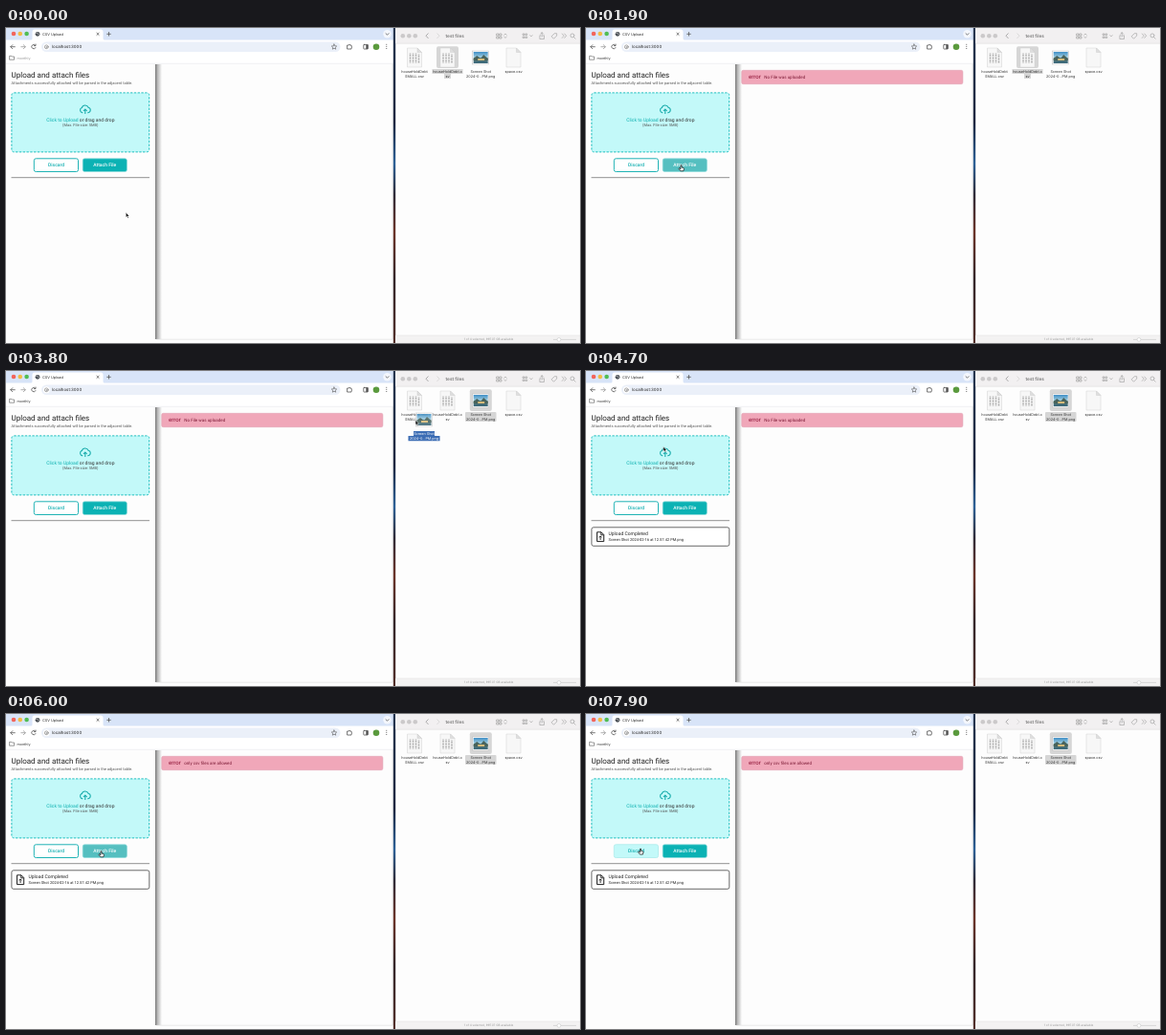
Recreate the animation shown at these times as an HTML page. Size 600 px wide and 330 px high, loop 8000 ms.

```html
<!DOCTYPE html>
<html lang="en">
<head>
<meta charset="utf-8">
<title>CSV Upload</title>
<style>
  html, body { margin: 0; width: 100%; height: 100%; overflow: hidden; background: #fdfdfd; }
  svg { display: block; width: 100vw; height: 100vh; text-rendering: geometricPrecision; }
  .page text { font-family: Roboto, Arial, sans-serif; }
  .ui text, .files text, #ghost text { font-family: Inter, Roboto, sans-serif; }
  .mid { text-anchor: middle; }
  .line { fill: none; stroke: #555; stroke-width: .8; stroke-linecap: round; stroke-linejoin: round; }
  .soft { stroke: #999; }
  .files text, #ghost text { font-size: 3.75px; text-anchor: middle; fill: #333; }
  #ghost text { fill: #fff; }
  .pick { fill: #d6d6d6; }
</style>
</head>
<body>
<svg viewBox="0 0 600 330" preserveAspectRatio="none">
  <defs>
    <linearGradient id="shade">
      <stop offset="0" stop-color="#747474"/>
      <stop offset=".3" stop-color="#b2b2b2"/>
      <stop offset="1" stop-color="#fdfdfd"/>
    </linearGradient>
    <linearGradient id="desk" x2="0" y2="1">
      <stop offset="0" stop-color="#27364f"/>
      <stop offset=".3" stop-color="#1c2740"/>
      <stop offset=".43" stop-color="#2e6298"/>
      <stop offset=".53" stop-color="#302c38"/>
      <stop offset=".65" stop-color="#6b3429"/>
      <stop offset=".8" stop-color="#34272a"/>
      <stop offset="1" stop-color="#53302b"/>
    </linearGradient>
    <linearGradient id="sky" x2="0" y2="1">
      <stop offset="0" stop-color="#3f8fc6"/>
      <stop offset=".5" stop-color="#a5cfdf"/>
      <stop offset=".55" stop-color="#59746a"/>
      <stop offset="1" stop-color="#38687d"/>
    </linearGradient>
    <g id="sheet">
      <path d="M-7.5-10H3L7.5-5.5V10H-7.5Z" fill="#f7f7f7" stroke="#d0d0d0" stroke-width=".5"/>
      <path d="M3-10V-5.5H7.5Z" fill="#dedede" stroke="#c8c8c8" stroke-width=".4"/>
    </g>
    <g id="table">
      <use href="#sheet"/>
      <path d="M-4.5-4.5V6M-1.5-4.5V6M1.5-4.5V6M4.5-3.5V6" stroke="#aaa" stroke-width="1.5" stroke-dasharray="1 .5"/>
    </g>
    <g id="photo">
      <rect x="-8.5" y="-7" width="17" height="14" fill="#fff" stroke="#bbb" stroke-width=".5"/>
      <rect x="-7.5" y="-6" width="15" height="12" fill="url(#sky)"/>
      <path d="M-7.5 1L-4-2 0 1 3-3 7.5 1V3H-7.5Z" fill="#48635c"/>
      <rect x="-3" y="1" width="7" height="2" fill="#d6ba79"/>
    </g>
  </defs>

  <rect width="600" height="330" fill="#fdfdfd"/>

  <g class="ui" id="browser">
    <rect width="405" height="14" fill="#d8e4f8"/>
    <path d="M26 13Q27.5 13 27.5 10V4Q27.5 1.5 30 1.5H99Q101.5 1.5 101.5 4V10Q101.5 13 103 13Z" fill="#fff"/>
    <rect y="12.5" width="405" height="25" fill="#fff"/>
    <circle cx="8" cy="6" r="2.3" fill="#f2655c"/>
    <circle cx="14.8" cy="6" r="2.3" fill="#f3bb43"/>
    <circle cx="21.6" cy="6" r="2.3" fill="#50bd55"/>
    <circle cx="33" cy="6.3" r="2.4" fill="#4c5157"/>
    <path d="M31.3 5.5Q33 4.5 33.5 6T34.6 7" fill="none" stroke="#ddd" stroke-width=".6"/>
    <text x="38" y="7.8" font-size="3.8" fill="#222">CSV Upload</text>
    <path class="line" d="M94.9 5.2L97.1 7.4M97.1 5.2L94.9 7.4M105.7 6.3H109.3M107.5 4.5V8.1"/>
    <circle cx="398.5" cy="6.3" r="4.2" fill="#f4f7fd"/>
    <path class="line" d="M397 5.7L398.5 7.2 400 5.7"/>
    <path class="line" d="M9.3 19.7H4.8L6.8 17.7M4.8 19.7L6.8 21.7M30.8 18.3A2.2 2.2 0 1 0 31 20.5M31 17V18.6H29.4"/>
    <path class="line soft" d="M15.8 19.7H20.3L18.3 17.7M20.3 19.7L18.3 21.7"/>
    <rect x="37" y="14.6" width="312.5" height="10.4" rx="5.2" fill="#ebf0f9"/>
    <circle cx="42.3" cy="19.8" r="3.5" fill="#fff"/>
    <circle class="line" cx="42.3" cy="19.8" r="1.9" style="stroke-width:.5"/>
    <path class="line" d="M42.3 19.5V20.7" style="stroke-width:.6"/>
    <text x="48" y="21.4" font-size="4.43" fill="#222">localhost:3000</text>
    <path class="line" d="M343 17L343.8 18.8 345.7 19 344.3 20.3 344.7 22.2 343 21.2 341.3 22.2 341.7 20.3 340.3 19 342.2 18.8Z" style="stroke-width:.6"/>
    <path class="line" d="M357 18H358.5Q359 16.2 359.6 18H361V19.4Q362.6 20 361 20.6V22H357Z"/>
    <rect class="line" x="373.8" y="17.4" width="4.6" height="4.6" rx=".5"/>
    <rect x="376.3" y="17.4" width="2" height="4.6" fill="#555"/>
    <circle cx="387" cy="19.8" r="3.3" fill="#5a9a3d"/>
    <path d="M397.8 17.3V22.8" stroke="#444" stroke-width="1" stroke-linecap="round" stroke-dasharray="0 2.1"/>
    <path class="line" d="M4 29.3H5.7L6.3 30H8.6V33.2H4Z" style="stroke-width:.6"/>
    <text id="mark" x="11.5" y="32.7" font-size="3.7">monthly</text>
    <path d="M0 37.3H405" stroke="#e4e6e9" stroke-width=".6"/>
  </g>

  <g class="page">
    <rect x="156" y="38" width="7" height="288" fill="url(#shade)"/>
    <path d="M157 326.2H404M404.2 38V326" stroke="#dcdcdc" stroke-width=".6" fill="none"/>
    <text x="5.5" y="51.8" font-size="8.03" fill="#222">Upload and attach files</text>
    <text x="5.5" y="59.3" font-size="4.02" fill="#555">Attachments successfully attached will be parsed in the adjacent table.</text>
    <rect x="5.9" y="67.9" width="143.8" height="62" rx="2.5" fill="#c3f9f9" stroke="#1fbfbf" stroke-width="1" stroke-dasharray="2.4 1.4"/>
    <path d="M80.3 88.7H79.8A2.7 2.7 0 0 1 79.3 83.5 3.6 3.6 0 0 1 86.1 83.2 2.8 2.8 0 0 1 85.8 88.7H85.2M82.8 90V85.1M81 86.8L82.8 85 84.6 86.8" fill="none" stroke="#15aaaa" stroke-width="1.05" stroke-linejoin="round"/>
    <text class="mid" x="77.8" y="97.5" font-size="5.01" fill="#333"><tspan fill="#0cb0b0">Click to Upload</tspan> or drag and drop</text>
    <text class="mid" x="77.8" y="103.3" font-size="4.05" fill="#555">(Max. File size: 5MB)</text>
    <rect id="discard" x="29.3" y="136.8" width="46.2" height="13.7" rx="2"/>
    <text class="mid" x="52.5" y="145.3" font-size="5" font-weight="500" fill="#10aeb0">Discard</text>
    <rect id="attach" x="80.2" y="136.8" width="46.2" height="13.7" rx="2" stroke="#8bdcdc" stroke-width=".7"/>
    <text class="mid" x="103.2" y="145.3" font-size="5" font-weight="500" fill="#fff">Attach File</text>
    <path d="M5.5 156.7H150" stroke="#858585" stroke-width=".9"/>
    <g id="done">
      <rect x="5.9" y="163.8" width="143.9" height="19.5" rx="2" fill="#fff" stroke="#444" stroke-width=".8"/>
      <path d="M11.5 168.8H16L18.7 171.5V178.6H11.5ZM15.8 169V171.8H18.5" fill="none" stroke="#222" stroke-width="1"/>
      <path d="M15.1 173V177M13.6 174.4L15.1 172.9 16.6 174.4" fill="none" stroke="#222" stroke-width=".9"/>
      <text x="23.5" y="172.2" font-size="5.03" fill="#222">Upload Completed</text>
      <text x="23.5" y="178.2" font-size="4" fill="#222">Screen Shot 2024-02-16 at 12.57.42 PM.png</text>
    </g>
    <g id="alert">
      <rect x="162.7" y="44.3" width="231.2" height="14.4" rx="1.6" fill="#f0a7b9" stroke="#dd9dae" stroke-width=".5"/>
      <text x="170" y="53.4" font-size="6.05" fill="#8c0f32">error</text>
      <text id="reason" x="186.3" y="53.1" font-size="4.5" fill="#7a1733"></text>
    </g>
  </g>

  <rect x="404.8" width="2.4" height="330" fill="url(#desk)"/>

  <g class="ui">
    <rect x="407" width="193" height="16" fill="#f2f0f1"/>
    <path d="M407 16.2H600" stroke="#dcdada" stroke-width=".6"/>
    <g fill="#cbc9ca">
      <circle cx="414.8" cy="8.2" r="2.3"/><circle cx="421.3" cy="8.2" r="2.3"/><circle cx="427.8" cy="8.2" r="2.3"/>
    </g>
    <path class="line soft" d="M441.2 5.8L439 8.2 441.2 10.6"/>
    <path class="line" d="M450.8 5.8L453 8.2 450.8 10.6" style="stroke:#d5d3d4"/>
    <text x="459.5" y="9.9" font-size="4.7" font-weight="600" fill="#777">test files</text>
    <g class="line soft" style="stroke:#999;stroke-width:.6">
      <path d="M513 6H515V8H513ZM516 6H518V8H516ZM513 9H515V11H513ZM516 9H518V11H516ZM520.7 7.2L522 6 523.3 7.2M520.7 9.2L522 10.4 523.3 9.2"/>
      <path d="M540.5 6H542V7.4H540.5ZM543.2 6H544.7V7.4H543.2ZM540.5 9H542V10.4H540.5ZM543.2 9H544.7V10.4H543.2ZM547.8 7.6L549 8.9 550.2 7.6"/>
      <path d="M558.8 7.8H557.9V11.5H562.5V7.8H561.6M560.2 9.3V4.8M558.8 6.1L560.2 4.7 561.6 6.1"/>
      <path d="M570.4 8.5L573.3 5.7H575.7V8.1L572.8 11ZM581.3 6L583.2 8.2 581.3 10.4M583.8 6L585.7 8.2 583.8 10.4"/>
      <path d="M593.6 9.6L595.2 11.2M594 7.9A2 2 0 1 1 590 7.9 2 2 0 1 1 594 7.9"/>
    </g>
    <rect x="407" y="322" width="193" height="8" fill="#f3f2f2"/>
    <path d="M407 322H600" stroke="#dedede" stroke-width=".5"/>
    <text class="mid" x="504.5" y="327.4" font-size="3.1" fill="#999">1 of 4 selected, 997.07 GB available</text>
    <path d="M572 326.4H596" stroke="#d0d0d0" stroke-width=".8"/>
    <circle cx="578" cy="326.4" r="1.9" fill="#fff" stroke="#c0c0c0" stroke-width=".5"/>
  </g>

  <g class="files">
    <g id="pickTable" class="pick">
      <rect x="450" y="19.3" width="23" height="22.8" rx="2"/>
      <path d="M445.5 43H477.5V48H465V53H458V48H445.5Z"/>
    </g>
    <g id="pickPhoto" class="pick">
      <rect x="484.8" y="19.3" width="23" height="22.8" rx="2"/>
      <rect x="480" y="43" width="32.5" height="10" rx="1"/>
    </g>
    <use href="#table" x="427" y="31"/>
    <use href="#table" x="461.5" y="31"/>
    <use href="#photo" x="496.2" y="31"/>
    <use href="#sheet" x="530.5" y="31"/>
    <text x="427" y="46.7">houseHoldDebt</text><text x="427" y="51.9">SMALL.csv</text>
    <text x="461.5" y="46.7">houseHoldDebt.c</text><text x="461.5" y="51.9">sv</text>
    <text x="496.2" y="46.7">Screen Shot</text><text x="496.2" y="51.9">2024-0...PM.png</text>
    <text x="530.5" y="46.7">space.csv</text>
  </g>

  <g id="ghost">
    <use href="#photo" opacity=".88"/>
    <path d="M-11 12H11V17H16.5V22.3H-16.5V17H-11Z" fill="#3c6db4"/>
    <text y="15.9">Screen Shot</text><text y="21">2024-0...PM.png</text>
  </g>

  <path id="arrow" d="M0 0V5L1.15 4 2 5.9 2.9 5.5 2.1 3.7H3.6Z" fill="#111" stroke="#fff" stroke-width=".45"/>
  <path id="hand" d="M-.5-2.6Q0-3.2.5-2.6V-.5L2.4 0Q3 .2 2.9 1L2.4 3.3H-.7L-2.5.8Q-2.4-.1-1.5.4L-.5 1.2Z" fill="#fff" stroke="#111" stroke-width=".7" stroke-linejoin="round"/>
</svg>
<script>
const LOOP = 8000, STEP = 100;
const $ = id => document.getElementById(id);

// Pointer stops: time, x, y
const stops = [
  [0, 125.3, 193.3], [200, 125.3, 193.3], [900, 99.5, 146.5], [1900, 99.5, 146.5],
  [2800, 447.8, 53.8], [3200, 487, 32], [3400, 487, 32], [3800, 428, 51.5],
  [4400, 80.8, 79.3], [4900, 80.8, 79.3], [5500, 99.5, 146.5], [6900, 99.5, 146.5],
  [7500, 57, 143.8], [LOOP, 57, 143.8]
];
const events = { firstError: 1600, select: 3300, lift: 3500, drop: 4500, secondError: 5900 };

const ease = p => p * p * (3 - 2 * p);
const show = (id, on) => $(id).setAttribute('display', on ? 'inline' : 'none');
const move = (id, x, y) => $(id).setAttribute('transform', `translate(${x} ${y})`);
const paint = (id, fill, stroke) => {
  $(id).setAttribute('fill', fill);
  if (stroke) $(id).setAttribute('stroke', stroke);
};

function pointerAt(t) {
  const i = stops.findIndex(s => s[0] > t);
  const [t0, x0, y0] = stops[i - 1], [t1, x1, y1] = stops[i];
  const p = ease((t - t0) / (t1 - t0));
  return [x0 + (x1 - x0) * p, y0 + (y1 - y0) * p];
}

function render(t) {
  const [x, y] = pointerAt(t);
  const dragging = t >= events.lift && t < events.drop;
  const inRow = y > 137 && y < 150.5 && !dragging;
  const overDiscard = inRow && x > 29 && x < 75.5;
  const overAttach = inRow && x > 80 && x < 126.5;
  const overButton = overDiscard || overAttach;

  paint('mark', t < STEP ? '#999' : '#333');
  paint('attach', overAttach ? '#55bfc0' : '#0bb2b4');
  paint('discard', overDiscard ? '#c3f9f9' : '#fff', overDiscard ? '#b5eeee' : '#20b3b5');

  show('alert', t >= events.firstError);
  $('reason').textContent = t < events.secondError ? 'No File was uploaded' : 'only csv files are allowed';
  show('done', t >= events.drop);
  show('pickTable', t < events.select);
  show('pickPhoto', t >= events.select);

  show('ghost', dragging);
  move('ghost', x + 9, y - .5);
  show('arrow', !overButton);
  show('hand', overButton);
  move('arrow', x, y);
  move('hand', x, y);
}

function tick(now) {
  render(Math.floor(now % LOOP / STEP) * STEP);
  requestAnimationFrame(tick);
}
$('discard').setAttribute('stroke-width', '1');
render(0);
requestAnimationFrame(tick);
</script>
</body>
</html>
```
